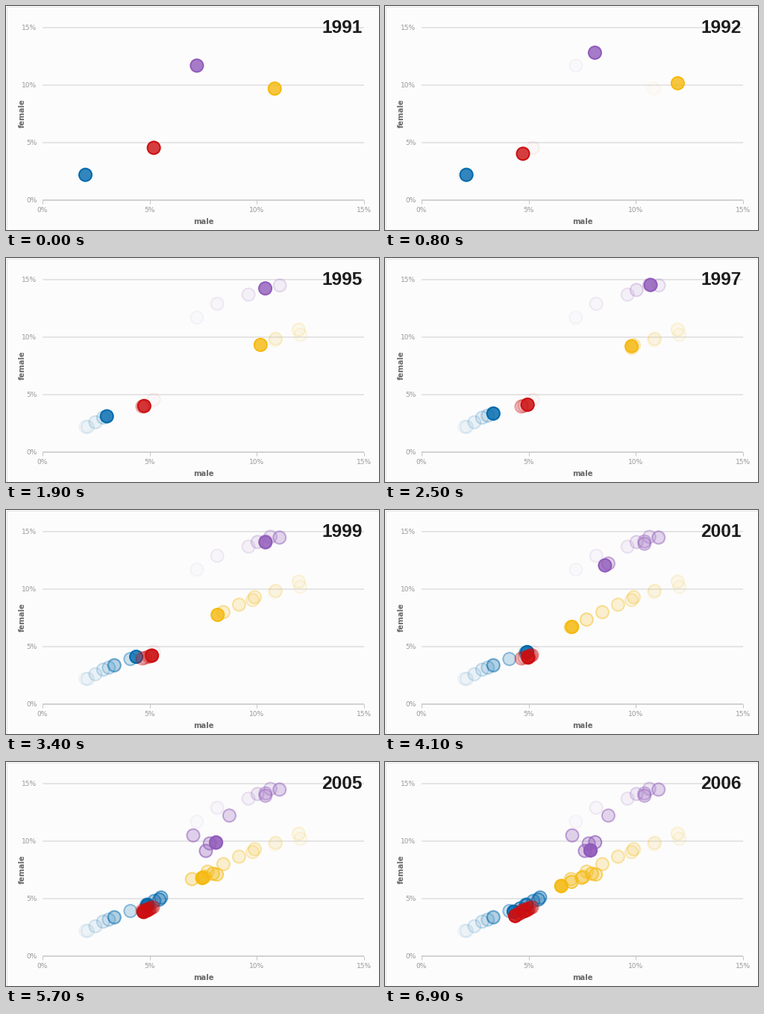
Recreate the animation shown at these times as a matplotlib script. Size 500 by 300 pixels, loop 8000 ms.

```python
import math

import matplotlib.pyplot as plt
import numpy as np
from matplotlib.animation import FuncAnimation
from matplotlib.patches import Circle, Rectangle

W, H, DPI = 500, 300, 100
FRAMES, INTERVAL = 80, 100
PX = 72 / DPI                       # points per pixel
FIRST_YEAR, STEPS = 1991, 15
START, STEP_MS, MOVE_DELAY = 400, 404.5, 22
TRAIL_START, TRAIL_END = 100, 6900
RADIUS = 8.5

# Turning points, years since the first: (male %, female %).
# The years between lie on straight lines.
BLUE = {0: (2.0, 2.2), 1: (2.1, 2.2), 3: (2.83, 3.0), 5: (3.35, 3.35), 6: (3.35, 3.4),
        8: (4.85, 4.45), 9: (4.9, 4.5), 11: (5.53, 5.1), 12: (5.45, 4.92),
        13: (4.9, 4.42), 15: (4.3, 3.87)}
RED = {0: (5.19, 4.55), 1: (4.7, 4.0), 3: (4.65, 3.96), 5: (4.94, 4.12),
       8: (5.15, 4.25), 9: (4.98, 4.06), 13: (4.72, 3.85), 15: (4.37, 3.5)}
YELLOW = {0: (10.83, 9.7), 1: (12.03, 10.2), 2: (11.95, 10.65), 4: (9.8, 9.05),
          5: (9.9, 9.3), 9: (6.97, 6.7), 11: (8.13, 7.1), 12: (7.95, 7.17),
          15: (6.52, 6.1)}
PURPLE = {0: (7.2, 11.7), 1: (8.15, 12.9), 3: (11.07, 14.5), 4: (10.03, 14.1),
          5: (10.63, 14.55), 6: (11.05, 14.48), 7: (10.4, 14.15), 8: (10.4, 13.95),
          10: (7.03, 10.5), 11: (7.8, 9.8), 12: (7.62, 9.15), 13: (8.1, 9.9),
          14: (7.88, 9.2)}


def to_px(x, y):
    return 49 + x * 431 / 15, 260 - y * 15.4


fig = plt.figure(figsize=(W / DPI, H / DPI), dpi=DPI, facecolor="#fcfcfc")
ax = fig.add_axes([0, 0, 1, 1])
ax.set_xlim(0, W)
ax.set_ylim(H, 0)
ax.axis("off")


def line(x0, y0, x1, y1, color, width):
    ax.plot([x0, x1], [y0, y1], color=color, lw=width * PX,
            solid_capstyle="butt", zorder=1)


def label(x, y, text, size, color, **kw):
    kw = {"family": "DejaVu Sans", "ha": "center", "va": "baseline", **kw}
    return ax.text(x, y, text, fontsize=size * PX, color=color, **kw)


def draw_axes():
    ax.add_patch(Rectangle((0.5, 0.5), W - 1, H - 1, fill=False,
                           ec="#e4e4e4", lw=PX, zorder=0))
    for v in range(0, 16, 5):
        x, y = to_px(v, v)
        if v:
            line(49, y, 480, y, "#dedede", 1.5)
        line(x, 260, x, 265, "#c4c4c4", 1)
        label(x, 276, f"{v}%", 9, "#999999")
        label(41.5, y + 3, f"{v}%", 9, "#999999", ha="right")
    line(49, 260, 480, 260, "#c4c4c4", 1.5)
    label(264.5, 292, "male", 10, "#6a6a6a", weight="bold")
    label(21.5, 144, "female", 10, "#6a6a6a", weight="bold",
          rotation=90, va="center")


class Series:
    """One moving dot and the fading trail of its yearly positions."""

    def __init__(self, turns, color, z):
        self.turns = turns
        self.color = color
        self.trail = [self.dot(i, 0.02 + 0.025 * i, 0.05 + 0.05 * i, z + i / 100)
                      for i in range(STEPS + 1)]
        self.head = self.dot(0, 0.8, 1, z + 0.5)

    def place(self, pos):
        male, female = zip(*self.turns.values())
        low = math.floor(pos)
        years = [low, low + 1]
        xs, ys = (np.interp(years, list(self.turns), rate) for rate in (male, female))
        x, y = (a + (b - a) * (pos - low) for a, b in (xs, ys))
        return to_px(x, y)

    def dot(self, pos, fill, edge, z):
        return ax.add_patch(Circle(self.place(pos), RADIUS, fc=(self.color, fill),
                                   ec=(self.color, edge), lw=2 * PX, zorder=z))

    def update(self, pos, shown):
        for i, patch in enumerate(self.trail):
            patch.set_visible(i < shown)
        self.head.center = self.place(pos)


draw_axes()
series = [
    Series(BLUE, "#0069ad", 2),
    Series(RED, "#cc0e10", 3),
    Series(YELLOW, "#f5b90f", 4),
    Series(PURPLE, "#915bba", 5),
]
year_text = label(477.5, 35.5, "", 24.5, "#1c1c1c", family="Liberation Sans",
                  weight="bold", ha="right", zorder=9)


def clamp(v, low, high):
    return min(max(v, low), high)


def update(frame):
    t = frame * INTERVAL
    pos = clamp((t - START - MOVE_DELAY) / STEP_MS, 0, STEPS)
    step = clamp(math.floor((t - START) / STEP_MS) + 1, 0, STEPS)
    shown = max(step, int(t >= TRAIL_START)) + int(t >= TRAIL_END)
    for s in series:
        s.update(pos, shown)
    year_text.set_text(str(FIRST_YEAR + step))
    return []


anim = FuncAnimation(fig, update, frames=FRAMES, interval=INTERVAL,
                     repeat=True, repeat_delay=0, blit=False)
plt.show()
```
